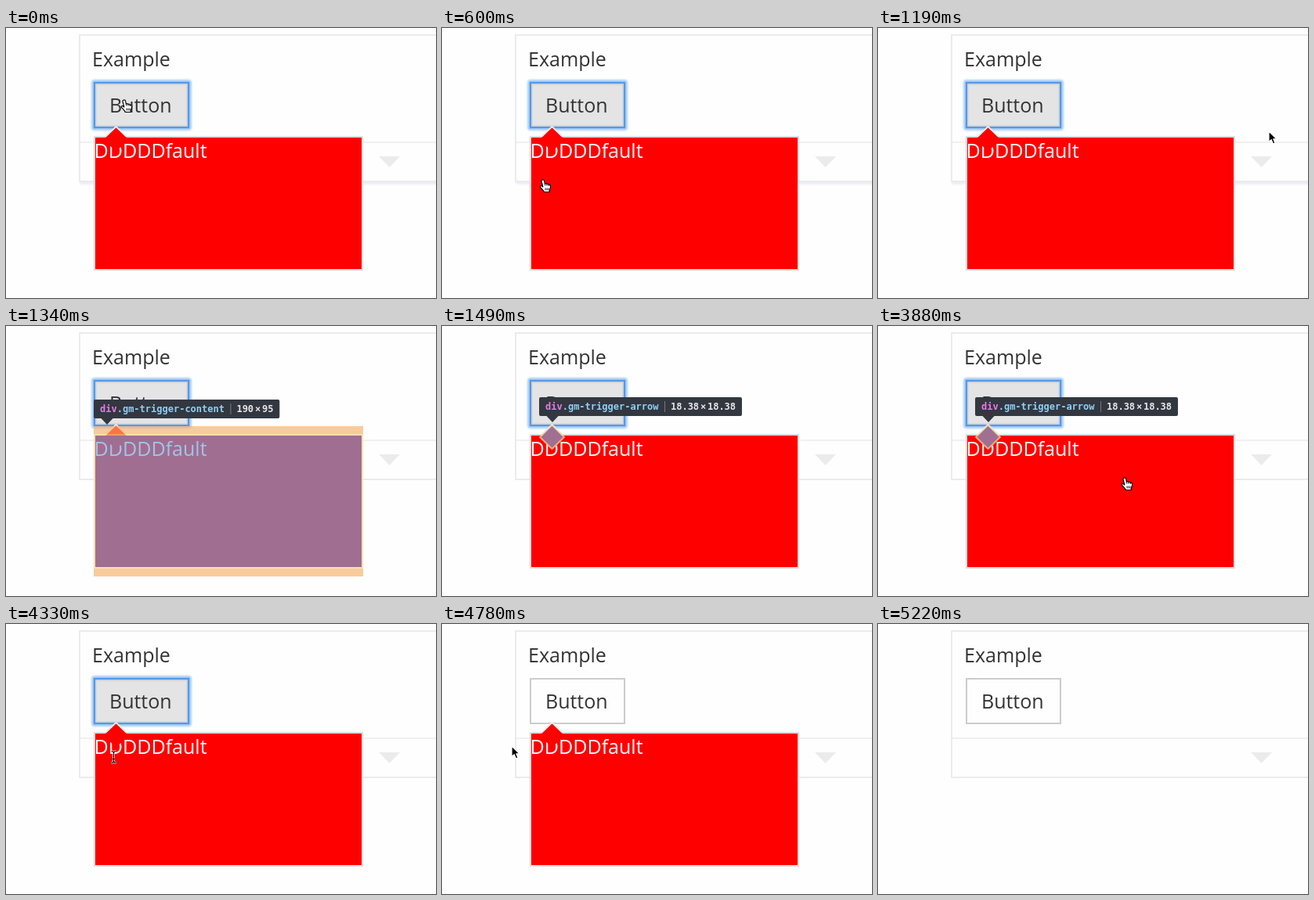
Recreate the animation shown at these times as an HTML page. Size 549 px wide and 345 px high, loop 6020 ms.

```html
<!DOCTYPE html>
<html lang="en">
<head>
<meta charset="utf-8">
<title>Popup inspection</title>
<style>
  html, body { margin: 0; width: 100%; height: 100%; overflow: hidden; background: #fefefe; }
  svg { display: block; width: 549px; height: 345px; }
  .ui { font: 25px "Open Sans", "Noto Sans", sans-serif; fill: #333; }
  .tip { font: bold 12px "DejaVu Sans Mono", monospace; fill: #e6e6e9; }
  .tag { fill: #ee78e6; }
  .cls { fill: #8fd0f5; }
</style>
</head>
<body>
<svg viewBox="0 0 549 345">
  <defs>
    <filter id="blur" x="-10%" y="-20%" width="120%" height="140%"><feGaussianBlur stdDeviation="1.1"/></filter>
  </defs>

  <g id="shade">
    <rect x="94" y="11" width="470" height="189" rx="3" fill="#ededf8" filter="url(#blur)"/>
  </g>
  <rect x="94" y="9" width="470" height="187" fill="#fefefe" stroke="#ebebeb" stroke-width="2"/>
  <path d="M95 146H549" stroke="#f0f0f0" stroke-width="2"/>
  <path d="M476 164H503L489.500 178Z" fill="#ebebeb"/>
  <text class="ui" x="110" y="49">Example</text>

  <rect id="idle" x="113" y="70" width="120" height="57" fill="#fefefe" stroke="#ccc" stroke-width="2"/>
  <g id="focus">
    <rect x="111" y="68" width="124" height="61" rx="2" fill="none" stroke="#a9cff8" stroke-width="4" filter="url(#blur)"/>
    <rect x="113" y="70" width="120" height="57" fill="#e4e4e4" stroke="#5798e6" stroke-width="2.600"/>
    <rect x="115" y="72" width="116" height="53" fill="none" stroke="#cfd2d8" stroke-width="1.500"/>
  </g>
  <text class="ui" x="132" y="108">Button</text>

  <g id="popup">
    <rect x="113" y="139" width="342" height="170" fill="#f00" stroke="#ddd" stroke-width="2"/>
    <text class="ui" x="112.500" y="166" style="fill:#fff">DDDDDfault</text>
    <path d="M140.500 126L156.500 142L140.500 158L124.500 142Z" fill="#f00"/>
    <path d="M127 139L140.500 126L154 139" fill="none" stroke="#eee" stroke-width="1.800"/>
  </g>

  <g id="inspect"></g>
  <g id="cursor"></g>
</svg>

<script>
const LOOP = 6020;
const CHAR = 7.224;
const BLUE = 'rgba(111,168,220,.66)';
const GREEN = 'rgba(147,196,125,.55)';
const YELLOW = 'rgba(255,229,153,.66)';
const ORANGE = 'rgba(246,178,107,.66)';
const $ = id => document.getElementById(id);

const box = (x, y, w, h, fill) =>
  `<rect x="${x}" y="${y}" width="${w}" height="${h}" fill="${fill}"/>`;

// area between an outer and an inner box, each [left, top, right, bottom]
const outline = ([l, t, r, b]) => `M${l} ${t}H${r}V${b}H${l}Z`;
const ring = (outer, inner, fill) =>
  `<path d="${outline(outer)}${outline(inner)}" fill="${fill}" fill-rule="evenodd"/>`;

function tip(x, y, tag, cls, w, h) {
  const nameEnd = x + 8 + CHAR * (tag + cls).length;
  const right = nameEnd + 27 + CHAR * (w + h).length + CHAR;
  return `<path d="M${x + 9} ${y + 23.5}h16l-8 8.500z" fill="#333740"/>
    <rect x="${x}" y="${y}" width="${right - x}" height="24" rx="2" fill="#333740"/>
    <path d="M${nameEnd + 8} ${y + 5}v14" stroke="#777b84"/>
    <text class="tip" x="${x + 8}" y="${y + 16}"><tspan class="tag">${tag}</tspan><tspan class="cls">${cls}</tspan></text>
    <text class="tip" x="${nameEnd + 15.5}" y="${y + 16}">${w}<tspan dx="1.8">×</tspan><tspan dx="1.8">${h}</tspan></text>`;
}

const buttonBox = [112, 69, 234, 128];
const buttonBody = [114, 71, 232, 126];
const buttonText = [133, 82, 212, 115];
const popupBox = [112, 138, 456, 310];

const views = {
  none: '',
  arrow: `<path d="M140.500 126.500L156 142L140.500 157L125 142Z" fill="${BLUE}" stroke="${YELLOW}" stroke-width="2"/>`
    + tip(124, 91, 'div', '.gm-trigger-arrow', '18.38', '18.38'),
  popup: ring([112, 128, 456, 320], popupBox, ORANGE)
    + ring(popupBox, [114, 140, 454, 308], YELLOW)
    + box(114, 140, 340, 168, BLUE)
    + tip(112, 94, 'div', '.gm-trigger-content', '190', '95'),
  wrap: box(112, 69, 122, 59, BLUE)
    + tip(112, 35, 'div', '.gm-trigger', '67.78', '32.78'),
  button: ring(buttonBox, buttonBody, YELLOW)
    + ring(buttonBody, buttonText, GREEN)
    + box(133, 82, 79, 33, BLUE)
    + tip(112, 35, 'button', '.gm-trigger-btn', '67.8', '32')
};

const cursors = {
  pointer: `<path d="M1 1V14.500L4.200 11.700L6.500 17L9 16L6.800 10.800H11Z"
    fill="#000" stroke="#fff" stroke-width="1.200" stroke-linejoin="round"/>`,
  hand: `<path d="M4.500 1C5.800 .8 6.400 1.500 6.600 2.500L7.300 6C8 5.300 9.300 5.500 9.700 6.500C10.600 5.900 11.900 6.300 12.200 7.300
    C13.300 6.900 14.500 7.500 14.600 8.900C14.800 11.500 13.700 12.700 13.200 14.500V16.500H6.300C5.600 14.500 3.300 12.600 1.600 10.300
    C.8 9.100 2.100 8 3.300 8.800L4.800 10L3 2.800C2.800 1.900 3.500 1.200 4.500 1Z"
    fill="#fff" stroke="#000" stroke-width="1.200" stroke-linejoin="round"/>
    <path d="M7.300 6L7.800 8.500M9.700 6.500L10.100 8.700M12.200 7.300L12.400 9M8 11.500V14.500M10 11.500V14.500M11.900 11.500V14.500"
    fill="none" stroke="#000" stroke-width=".9"/>`,
  beam: ['#fff" stroke-width="2.600', '#000" stroke-width="1.200'].map(s =>
    `<path d="M1.500 1.500Q4.500 1.500 4.500 4V14Q4.500 16.500 1.500 16.500M7.500 1.500Q4.500 1.500 4.500 4M4.500 14Q4.500 16.500 7.500 16.500M3 11.500H6"
    fill="none" stroke="${s}"/>`).join('')
};

// start time, cursor, x, y, inspected part
const steps = [
  [0, 'hand', 146, 91, 'none'],
  [150, 'beam', 190, 143, 'none'],
  [300, 'pointer', 106, 144, 'none'],
  [450, 'pointer', 163, 131, 'none'],
  [600, 'hand', 124, 193, 'none'],
  [750, 'hand', 149, 113, 'none'],
  [900, 'beam', 206, 161, 'none'],
  [1050, 'beam', 210, 161, 'none'],
  [1190, 'pointer', 498, 131, 'none'],
  [1340, '', 0, 0, 'popup'],
  [1490, '', 0, 0, 'arrow'],
  [1630, '', 0, 0, 'button'],
  [1780, '', 0, 0, 'wrap'],
  [1930, '', 0, 0, 'arrow'],
  [3880, 'hand', 310, 193, 'arrow'],
  [4030, 'hand', 141, 175, 'none'],
  [4180, 'beam', 135, 161, 'none'],
  [4330, 'beam', 133, 161, 'none'],
  [4480, 'pointer', 107, 150, 'none'],
  [4630, 'pointer', 88, 154, 'none'],
  [4780, 'pointer', 88, 155, 'none'],
  [5070, 'pointer', 93, 298, 'none'],
  [5220, '', 0, 0, 'none']
];

const show = (id, on) => { $(id).style.display = on ? '' : 'none'; };

let last = '';
function draw(t) {
  const [, kind, x, y, view] = steps.findLast(s => s[0] <= t);
  show('shade', t < 1340);
  show('focus', t < 4780);
  show('popup', t < 4920);
  const key = kind + x + ',' + y + view;
  if (key === last) return;
  last = key;
  $('inspect').innerHTML = views[view];
  $('cursor').innerHTML = cursors[kind] || '';
  $('cursor').setAttribute('transform', `translate(${x} ${y})`);
}

const start = performance.now();
function tick() {
  draw((performance.now() - start) % LOOP);
  requestAnimationFrame(tick);
}
tick();
</script>
</body>
</html>
```
